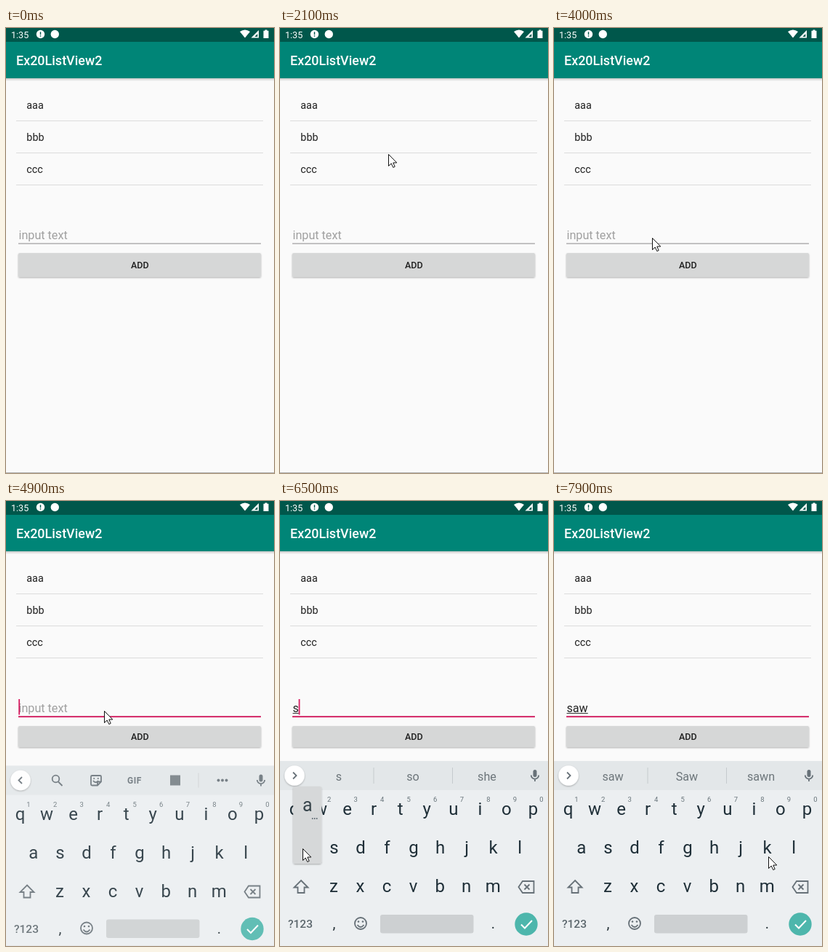
These frames come from a looping animation (369 px wide and 611 px high, 8000 ms). An HTML page:

```html
<!DOCTYPE html>
<html lang="en">
<head>
<meta charset="utf-8">
<title>List view demo</title>
<style>
html, body { margin: 0; width: 100%; height: 100%; overflow: hidden; background: #fafafa; }
svg { display: block; width: 369px; height: 611px; font-family: Roboto, sans-serif; }
.mid { text-anchor: middle; }
.med { font-weight: 500; }
.icon { fill: none; stroke: #677178; stroke-width: 1.8; }
</style>
</head>
<body>
<svg viewBox="0 0 369 611" xmlns="http://www.w3.org/2000/svg">
  <defs>
    <linearGradient id="drop" x2="0" y2="1">
      <stop stop-color="#000" stop-opacity=".2"/><stop offset="1" stop-color="#000" stop-opacity="0"/>
    </linearGradient>
    <filter id="soft" x="-20%" y="-20%" width="140%" height="140%">
      <feDropShadow dx="0" dy="1" stdDeviation="1" flood-opacity=".3"/>
    </filter>
    <clipPath id="row"><rect id="rowBox" x="14" width="340" height="43"/></clipPath>
  </defs>

  <rect width="369" height="611" fill="#fafafa"/>
  <rect y="69" width="369" height="4" fill="url(#drop)"/>
  <rect width="369" height="69" fill="#008577"/>
  <rect width="369" height="19" fill="#00574b"/>
  <g fill="#fff">
    <text x="7" y="13.5" font-size="12.56">1:35</text>
    <circle cx="47.5" cy="8.5" r="5.7"/>
    <path d="M47.5 5.2v4M47.5 10.3v1.5" stroke="#00574b" stroke-width="1.4"/>
    <circle cx="67.3" cy="8.5" r="5.7"/>
    <path d="M322 5Q329 0 336 5L329 13.5Z"/>
    <path d="M348 3V13.5H337.5Z"/>
    <path d="M346.3 8v4h-4Z" fill="#00574b"/>
    <path d="M354.5 3.7h2v-1.2h3v1.2h2V14h-7Z"/>
    <text class="med" x="14" y="51" font-size="17.94">Ex20ListView2</text>
  </g>

  <circle id="ripple" clip-path="url(#row)" fill="#000"/>
  <g id="list" font-size="14.4" fill="#212121"></g>

  <text id="hint" x="17.5" y="289.5" font-size="16.15" fill="#a0a0a0">input text</text>
  <text id="typed" x="17.5" y="289.5" font-size="16.15" fill="#212121"></text>
  <rect id="compose" x="17.5" y="291" height="1" fill="#333"/>
  <rect x="17" y="295.5" width="334" height="1" fill="#8c898b"/>
  <rect id="focus" x="17" y="295.3" width="334" height="1.8" fill="#d81b60"/>
  <rect id="caret" y="272" width="1.8" height="21.5" fill="#d81b60"/>

  <rect id="button" x="17" y="309" width="334" rx="1.8" fill="#d6d7d7" filter="url(#soft)"/>
  <text id="add" class="mid med" x="184.3" font-size="12.56" fill="#212121">ADD</text>
  <rect y="610" width="369" height="1" fill="#b5b5b5"/>

  <g id="kb">
    <rect y="357" width="369" height="262" fill="#eceff1"/>
    <rect y="357" width="369" height="40" fill="#e3e7e9"/>
    <circle cx="20" cy="377" r="13.7" fill="#fff" filter="url(#soft)"/>
    <path id="chevron" class="icon"/>
    <g id="tools">
      <circle class="icon" cx="68.5" cy="375" r="4.8"/>
      <path class="icon" d="M72 379l5.5 5.5"/>
      <path class="icon" d="M118.500 370.500H129.500Q131 370.500 131 372V379L126 384H118.500Q117 384 117 382.500V372Q117 370.500 118.500 370.500ZM131 379H126V384M120 377.500Q123.500 382 127 377.500M120.500 374.500h1.500M126 374.500h1.500" stroke-width="1.5"/>
      <text class="mid" x="177" y="381" font-size="12" font-weight="700" letter-spacing=".6" fill="#677178">GIF</text>
      <rect x="226" y="370" width="14" height="14" fill="#747d83"/>
      <path d="M265 367v20" stroke="#cdd2d4"/>
      <g fill="#677178"><circle cx="292.500" cy="377" r="2"/><circle cx="298" cy="377" r="2"/><circle cx="303.500" cy="377" r="2"/></g>
    </g>
    <g id="words" class="mid" font-size="16.15" fill="#6c757a">
      <path d="M129 366v22M237.500 366v22" stroke="#c5cacd"/>
      <text x="81" y="383.500"></text><text x="183" y="383.500"></text><text x="285" y="383.500"></text>
    </g>
    <rect x="348.500" y="369" width="5" height="10" rx="2.500" fill="#677178"/>
    <path class="icon" d="M345.800 376.500a5.200 5.200 0 0 0 10.400 0M351 381.500v3.500" stroke-width="1.500"/>

    <g id="keys" class="mid" font-size="24" fill="#1f2f38"></g>
    <g id="digits" class="mid" font-size="9.500" fill="#69757b"></g>
    <path class="icon" d="M29 521L38.500 530.500H33.500V538H24.500V530.500H19.500Z"/>
    <path class="icon" d="M334 522H349.500V538H334L328.500 530ZM336.500 526.500l7 7M343.500 526.500l-7 7"/>
    <text class="med" x="11" y="586" font-size="15.500" fill="#5c676d">?123</text>
    <g class="mid" font-size="20" fill="#263238"><text x="74.500" y="587">,</text><text x="293.500" y="587">.</text></g>
    <circle class="icon" cx="111" cy="580" r="8"/>
    <path class="icon" d="M106.500 582Q111 588 115.500 582"/>
    <g fill="#677178"><circle cx="108" cy="577.500" r="1.300"/><circle cx="114" cy="577.500" r="1.300"/></g>
    <rect x="138" y="568" width="128.500" height="25.500" rx="3" fill="#cdd0d2"/>
    <circle cx="339" cy="581" r="15.700" fill="#4db6ac"/>
    <path d="M332 581.500l5 5L347 576" fill="none" stroke="#fff" stroke-width="2"/>
  </g>

  <g id="popup">
    <rect x="-19.500" width="39" height="106" rx="3" fill="#d6d8d9" filter="url(#soft)"/>
    <text class="mid" y="34" font-size="25" fill="#37444b"></text>
    <g fill="#55626a"><circle cx="7" cy="44" r=".9"/><circle cx="10" cy="44" r=".9"/><circle cx="13" cy="44" r=".9"/></g>
  </g>

  <path id="pointer" d="M.5 .5V16.500L4.200 13 6.800 18.500 9.200 17.400 6.800 12H11.800Z" fill="#fff" stroke="#111" stroke-width="1"/>
</svg>
<script>
const LOOP = 8000, STEP = 100;
const $ = id => document.getElementById(id);
const set = (el, attrs) => { for (const k in attrs) el.setAttribute(k, attrs[k]); };
const show = (el, on) => { el.style.display = on ? '' : 'none'; };

function make(parent, tag, attrs, text = '') {
  const el = document.createElementNS('http://www.w3.org/2000/svg', tag);
  set(el, attrs);
  el.textContent = text;
  parent.append(el);
}

['aaa', 'bbb', 'ccc'].forEach((label, i) => {
  make($('list'), 'text', { x: 28.3, y: 111 + 44 * i }, label);
  make($('list'), 'rect', { x: 14, y: 127 + 44 * i, width: 340, height: 1, fill: '#dcdcdc' });
});
[['qwertyuiop', 19.5, 431], ['asdfghjkl', 37.8, 484], ['zxcvbnm', 74, 537]].forEach(([row, x, y]) =>
  [...row].forEach((c, i) => make($('keys'), 'text', { x: x + 36.55 * i, y }, c)));
[...'1234567890'].forEach((c, i) => make($('digits'), 'text', { x: 31 + 36.55 * i, y: 413 }, c));

// time, x, y of the pointer tip
const path = [
  [400, 336, 110], [1000, 148, 151], [1900, 148, 152], [2100, 149, 173], [2300, 144, 196],
  [2400, 144, 198], [2500, 144, 200], [2600, 144, 200], [2700, 143, 212], [3600, 143, 212],
  [4000, 135, 288], [5200, 135, 288], [5700, 69, 486], [6100, 69, 486], [6300, 31, 477],
  [6600, 31, 477], [6900, 294, 538], [7000, 290, 537], [7500, 290, 537], [7900, 295, 488]
];
const taps = [{ at: 1500, x: 148, y: 151, top: 128 }, { at: 3200, x: 143, y: 205, top: 172 }];
const presses = [
  { from: 5800, to: 6100, key: 's', x: 74, y: 392 },
  { from: 6400, to: 6600, key: 'a', x: 37.7, y: 392 },
  { from: 7300, to: 7400, key: 'm', x: 293.5, y: 445 }
];
const edits = [
  { at: 4600, text: '', words: [] },
  { at: 6100, text: 's', words: ['s', 'so', 'she'] },
  { at: 6600, text: 'sa', words: ['sa', 'say', 'said'] },
  { at: 7400, text: 'saw', words: ['saw', 'Saw', 'sawn'] }
];

function pointerAt(t) {
  const i = path.findIndex(p => p[0] > t);
  if (i < 0) return path[path.length - 1].slice(1);
  const a = path[Math.max(0, i - 1)], b = path[i];
  const u = Math.min(1, Math.max(0, (t - a[0]) / (b[0] - a[0])));
  const e = u * u * (3 - 2 * u);
  return [a[1] + (b[1] - a[1]) * e, a[2] + (b[2] - a[2]) * e];
}

function drawRipple(t) {
  const tap = taps.find(p => t >= p.at && t < p.at + 600);
  show($('ripple'), tap);
  if (!tap) return;
  const u = (t - tap.at) / 600;
  set($('rowBox'), { y: tap.top });
  set($('ripple'), { cx: tap.x, cy: tap.y, r: 30 + 200 * Math.min(1, u * 2), opacity: 0.11 * (1 - u) });
}

function drawField(t) {
  const edit = edits.filter(e => e.at <= t).pop();
  const text = edit ? edit.text : '';
  $('typed').textContent = text;
  const width = text ? $('typed').getComputedTextLength() : 0;
  show($('hint'), !text);
  set($('compose'), { width });
  set($('focus'), { opacity: t < 4600 ? 0 : t < 4700 ? 0.5 : 1 });
  const start = edit && Math.max(edit.at, 4700);
  show($('caret'), edit && t >= start && Math.floor((t - start) / 500) % 2 === 0);
  set($('caret'), { x: 17.3 + width });
  const words = edit ? edit.words : [];
  show($('words'), text);
  show($('tools'), !text);
  set($('chevron'), { d: text ? 'M18 372.500l4.500 4.500-4.500 4.500' : 'M22 372.500l-4.500 4.500 4.500 4.500' });
  $('words').querySelectorAll('text').forEach((el, i) => { el.textContent = words[i] || ''; });
}

function drawKeyboard(t) {
  const open = t >= 4900, sliding = t < 5000;
  show($('kb'), open);
  set($('kb'), { transform: `translate(0 ${sliding ? 6.5 : 0})`, opacity: sliding ? 0.88 : 1 });
  set($('button'), { height: open ? 29 : 33 });
  set($('add'), { y: open ? 328 : 330 });
  const press = presses.find(p => t >= p.from && t < p.to);
  show($('popup'), press);
  if (!press) return;
  set($('popup'), { transform: `translate(${press.x} ${press.y})` });
  $('popup').querySelector('text').textContent = press.key;
}

function draw(t) {
  drawRipple(t);
  drawField(t);
  drawKeyboard(t);
  show($('pointer'), t >= 400);
  set($('pointer'), { transform: `translate(${pointerAt(t)})` });
}

const begin = performance.now();
function tick() {
  const t = (performance.now() - begin) % LOOP;
  draw(Math.floor(t / STEP) * STEP);
  requestAnimationFrame(tick);
}
tick();
</script>
</body>
</html>
```
